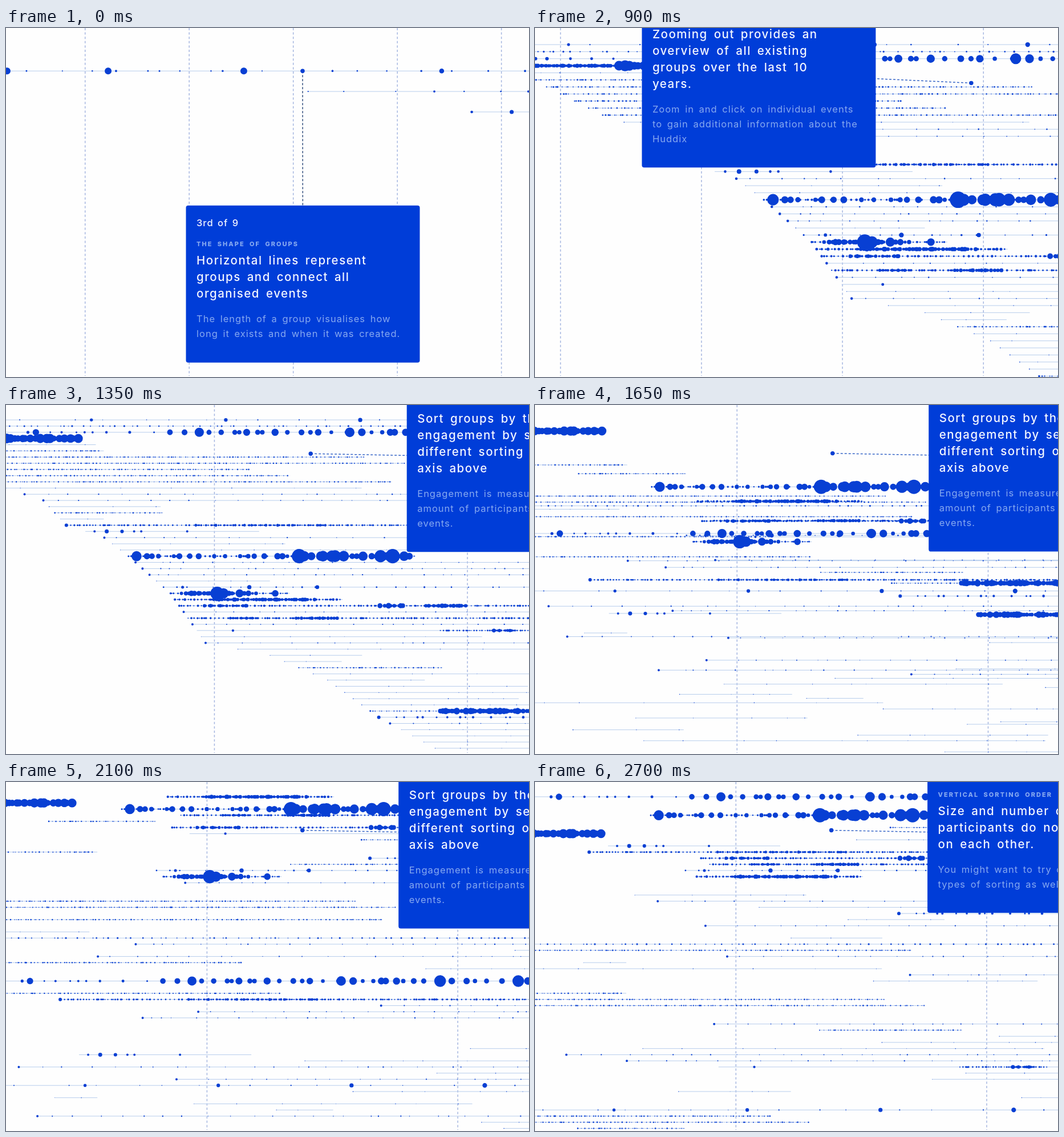
Recreate the animation shown at these times as an HTML page. Size 917 px wide and 611 px high, loop 2850 ms.

```html
<!DOCTYPE html>
<html lang="en">
<head>
<meta charset="utf-8">
<title>Group timeline</title>
<style>
  html, body { margin: 0; width: 100%; height: 100%; overflow: hidden; background: #fefefe; }
  svg { display: block; width: 100vw; height: 100vh; }
  text { font-family: Inter, "Open Sans", sans-serif; white-space: pre; }
  .count { font-size: 16.5px; font-weight: 500; letter-spacing: 1px; word-spacing: 2px; fill: #f2f6ff; }
  .label { font-size: 11px; font-weight: 800; letter-spacing: 2px; word-spacing: 4px; fill: #86a9f0; }
  .title { font-size: 20.5px; font-weight: 500; letter-spacing: 1.5px; word-spacing: 4px; fill: #f2f6ff; }
  .body { font-size: 16.5px; letter-spacing: 1px; word-spacing: 3px; fill: #86a9f0; }
  .line { stroke: #b7cdec; stroke-width: 1; vector-effect: non-scaling-stroke; }
  .dots { fill: #083fd3; }
  .tick { stroke: #a5b6e0; stroke-width: 1.5; stroke-dasharray: 4 3.6; }
  .leader { stroke-width: 1.5; stroke-dasharray: 4 3; }
</style>
</head>
<body>
<svg viewBox="0 0 917 611" preserveAspectRatio="none">
  <g id="ticks"></g>
  <g id="lines"></g>
  <g id="dots"></g>
  <g id="cards"></g>
</svg>
<script>
const LOOP = 2850, STEP = 150, GAP = 10.75, COUNT = 63, END = 1200, EARLY = -243;
const byId = id => document.getElementById(id);
const mix = (a, b, p) => a + (b - a) * p;
const set = (el, attrs) => { for (const k in attrs) el.setAttribute(k, attrs[k]); };

function add(parent, name, attrs = {}, text) {
  const el = document.createElementNS('http://www.w3.org/2000/svg', name);
  set(el, attrs);
  if (text) el.textContent = text;
  return parent.appendChild(el);
}

function random(seed) {
  let n = seed * 7919 + 17;
  return () => (n = (n * 16807) % 2147483647) / 2147483647;
}

// Groups are ordered by their beginning, which follows this curve.
const beginnings = [[0, -900], [1, -632.5], [2, -546.5], [3, -260], [5, -150], [10, -43], [13, 55],
  [17, 95], [19, 161], [22, 203], [28, 276], [36, 337], [38, 449], [42, 549], [48, 638], [62, 912]];

function beginning(date) {
  const k = Math.max(1, beginnings.findIndex(p => p[0] >= date));
  const [d0, x0] = beginnings[k - 1], [d1, x1] = beginnings[k];
  return mix(x0, x1, (date - d0) / (d1 - d0));
}

// One horizontal line with its slots in the three orders.
class Group {
  constructor(date, first, second, end = END) {
    const x0 = beginning(date);
    Object.assign(this, { date, first, second, x0, end, rnd: random(date + 1), path: '' });
    this.line = add(byId('lines'), 'line', { class: 'line', x1: x0, x2: end });
    this.dots = add(byId('dots'), 'path', { class: 'dots' });
    groups.push(this);
  }
  dot(x, r) {
    r = +r.toFixed(2);
    this.path += `M${(x - r).toFixed(2)} 0a${r} ${r} 0 1 0 ${2 * r} 0a${r} ${r} 0 1 0 ${-2 * r} 0`;
    this.dots.setAttribute('d', this.path);
    return this;
  }
  // Scattered dots with a mean spacing and radius.
  run(from, to, gap, r) {
    for (let x = from; x < to; x += gap * (0.35 + 1.3 * this.rnd()))
      this.dot(x, r * (0.65 + 0.7 * this.rnd()));
    return this;
  }
  fill(gap, r) { return this.run(Math.max(this.x0, EARLY), this.end, gap, r); }
}
const groups = [];
const group = (...args) => new Group(...args);

// Long groups at the top
const yearly = group(0, 47, 51).run(-800, EARLY, 13, .45).fill(60, .9);
for (let x = 138.5 - 4 * 233.6; x < END; x += 233.6) yearly.dot(x, 2.4 + x / 500);
for (const x of [-790.7, -737.6, -666.3, -493.8, -377.4]) yearly.dot(x, 1.8);
group(1, 23, 24).run(-632.5, EARLY, 18, .45).fill(14, 1.2);
group(2, 30, 0).run(-546.5, EARLY, 36, .9).run(EARLY, 275, 36, 2).run(275, END, 17, 5)
  .dot(42, 5.6).dot(326, 8).dot(587.5, 8.3).dot(761, 10.3).dot(898, 10.2);
group(3, 1, 6, 122).run(-260, -248, 5, 2).run(-146, -18, 2.6, 2.4).run(-18, 122, 7, 6.8);

// Very active groups
group(17, 33, 9).fill(5, 1.4).run(320, 560, 6, 1.9).dot(95, 3);
group(18, 42, 8, 430).run(144, 242, 20, 2.6).dot(305, 2);
group(22, 2, 3, 702).fill(9, 1.6).run(235, 495, 18, 4.3).run(495, 702, 10, 7.5)
  .dot(217, 8.8).dot(499.5, 12.5).dot(541, 9.3).dot(562, 10.3).dot(641, 10.6).dot(662, 12.5);
group(27, 12, 12).fill(28, 1.2).dot(297, 2.5).dot(413, 3.6).dot(531, 3.3);
group(28, 13, 58, 483).fill(5, 1.4).run(295, 425, 5, 3.6)
  .dot(357, 11.7).dot(368, 9).dot(396, 7).dot(458, 5.8);
group(29, 0, 13, 575).fill(4, 1.7).run(345, 530, 4, 2.7);
group(30, 5, 10, 900).fill(5, 1.5).run(335, 412, 4, 2.3).run(640, 680, 5, 3.4).run(720, 792, 4, 3)
  .dot(655, 5);
group(32, 3, 11).fill(5, 1.4).run(380, 430, 4, 2).run(490, 570, 4, 2.2);
group(34, 6, 44).run(384.5, 392, 5, 2.8).run(745, 900, 5, 1.3).run(838, 876, 4, 2.5);
group(47, 7, 5, 930).fill(6, 1.1).run(745, 920, 4, 4.3);
group(48, 10, 19).fill(19, 1.9).dot(638, 3);
group(55, 8, 4).fill(4, 4.3);

// Groups of many small events: date, both slots, end
for (const g of [[5, 9, 32, 160], [6, 17, 33, 612], [7, 18, 34, 683], [8, 27, 52, 413],
  [9, 32, 53, 481], [10, 20, 25, 660], [15, 4, 54, 263], [40, 11, 38, 749]]) group(...g).fill(5.5, 1);

// Groups of rare events: date and both slots
for (const g of [[12, 44, 57], [13, 52, 42], [19, 26, 43], [23, 55, 17], [24, 24, 63], [25, 36, 64],
  [31, 46, 21], [33, 14, 37], [36, 35, 26], [49, 34, 29]]) {
  const one = group(...g).fill(35, .9);
  one.dot(one.x0, 2);
}

// All remaining groups take free slots by chance.
const chance = random(5);
function freeSlots(key) {
  const used = new Set(groups.map(g => g[key]));
  return Array.from({ length: 80 }, (_, k) => k).filter(k => !used.has(k))
    .map(k => [chance(), k]).sort((a, b) => a[0] - b[0]).map(pair => pair[1]);
}
const firstFree = freeSlots('first'), secondFree = freeSlots('second');
const known = new Set(groups.map(g => g.date));
for (let date = 0; date < COUNT; date++) {
  if (known.has(date)) continue;
  const end = beginning(date) + 60 + 700 * chance();
  group(date, firstFree.pop(), secondFree.pop(), end).fill(70, .6);
}

// Info cards, each tied to a point on the timeline.
const cards = [];
function card(from, to, pin, dx, dy, stroke, count, label, title, body) {
  const g = add(byId('cards'), 'g');
  const h = 136 + 29 * title.length + 26 * body.length;
  const leader = add(g, 'line', { class: 'leader', stroke });
  const dot = add(g, 'circle', { class: 'dots', r: 3.7 });
  const box = add(g, 'g');
  add(box, 'rect', { width: 410, height: h, rx: 4, fill: '#003dd8' });
  const put = (cls, y, s) => add(box, 'text', { class: cls, x: 18.5, y }, s);
  put('count', 36, count);
  put('label', 71.5, label);
  title.forEach((s, k) => put('title', 103.5 + 29 * k, s));
  body.forEach((s, k) => put('body', 117.5 + 29 * title.length + 26 * k, s));
  cards.push({ g, leader, dot, box, h, from, to, pin, dx, dy });
}

const pin = { x: 519.6, slot: 5.45 };
card(0, 150, { x: -635.4, slot: 0 }, -204.5, 373, '#34507f', '3rd of 9', 'THE SHAPE OF GROUPS',
  ['Horizontal lines represent', 'groups and connect all', 'organised events'],
  ['The length of a group visualises how', 'long it exists and when it was created.']);
card(750, 1350, pin, -577.5, -17, '#3a68c8', '4th of 9', 'OVERVIEW',
  ['Zooming out provides an', 'overview of all existing', 'groups over the last 10', 'years.'],
  ['Zoom in and click on individual events', 'to gain additional information about the', 'Huddix']);
card(1350, 2250, pin, 168.5, 7, '#3a68c8', '5th of 9', 'VERTICAL SORTING ORDER',
  ['Sort groups by their', 'engagement by selecting', 'different sorting on the', 'axis above'],
  ['Engagement is measured by the', 'amount of participants and', 'events.']);
card(2250, LOOP, pin, 168.5, 7, '#3a68c8', '6th of 9', 'VERTICAL SORTING ORDER',
  ['Size and number of', 'participants do not depend', 'on each other.'],
  ['You might want to try other', 'types of sorting as well.']);

// From time, one tick and the spacing on the timeline.
const tickSets = [[0, -749.7, 54.7], [300, -550.7, 212.2], [750, -107.4, 215.2], [1350, 352.3, 439.7]];
const ticks = Array.from({ length: 8 }, () => add(byId('ticks'), 'line', { class: 'tick', y2: 609 }));

const zoom = t => 1 + 2.45 / (1 + Math.exp(.0064 * (t - 472)));

function ease(u) {
  u = Math.min(1, Math.max(0, u));
  return u < .5 ? 4 * u ** 3 : 1 - 4 * (1 - u) ** 3;
}

function draw(t) {
  const s = zoom(t), tx = 1130 * (s - 1);
  const slotY = slot => 4.8 + GAP * s * (slot + 1.964);

  for (const { line, dots, date, first, second } of groups) {
    const late = t - .35 * date;
    const sorted = mix(date, first, ease((late - 1350) / 563));
    const y = slotY(mix(sorted, second, ease((late - 2110) / 563)));
    const transform = `translate(${tx} ${y}) scale(${s})`;
    set(line, { transform });
    set(dots, { transform });
  }

  const [, x0, gap] = tickSets.filter(k => k[0] <= t).pop();
  const start = Math.ceil((-tx / s - x0) / gap);
  ticks.forEach((el, k) => {
    const x = tx + s * (x0 + gap * (start + k));
    set(el, { x1: x, x2: x });
  });

  for (const c of cards) {
    const on = t >= c.from && t < c.to;
    c.g.style.display = on ? '' : 'none';
    if (!on) continue;
    const x = tx + s * c.pin.x, y = slotY(c.pin.slot);
    const left = x + c.dx, mid = y + c.dy;
    set(c.dot, { cx: x, cy: y });
    set(c.leader, { x1: x, y1: y, x2: left + 205, y2: mid });
    set(c.box, { transform: `translate(${left} ${mid - c.h / 2})` });
  }
}

const began = performance.now();
let shown = -1;
function tick() {
  const t = Math.floor(((performance.now() - began) % LOOP) / STEP) * STEP;
  if (t !== shown) draw(shown = t);
  requestAnimationFrame(tick);
}
tick();
</script>
</body>
</html>
```
